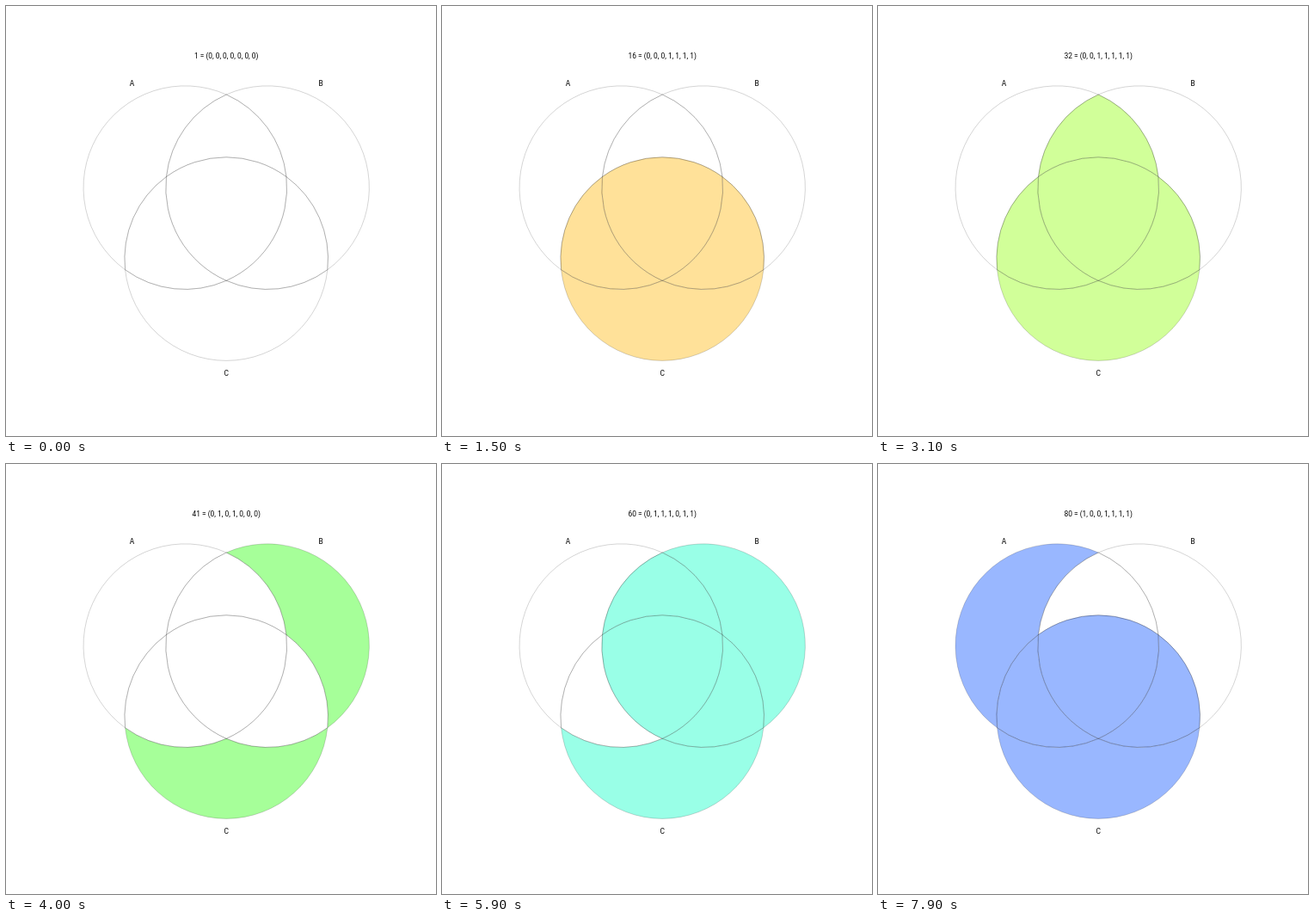
Animation of 500x500 px, one loop 8000 ms. Source, as an HTML page:

```html
<!DOCTYPE html>
<html lang="en">
<head>
<meta charset="utf-8">
<title>Venn diagram subsets</title>
<style>
  html, body { margin: 0; width: 100%; height: 100%; overflow: hidden; background: #fff; }
  svg { display: block; width: 100%; height: 100%; }
  text { font: 8.4px Roboto, sans-serif; text-anchor: middle; fill: #000; }
  #lines { fill: none; stroke: #000; stroke-opacity: .17; stroke-width: 1; stroke-linejoin: round; }
</style>
</head>
<body>
<svg viewBox="0 0 500 500">
  <g id="fills"></g>
  <g id="lines"></g>
  <text id="title" x="256.2" y="61"></text>
  <text x="146.5" y="93">A</text>
  <text x="366" y="93">B</text>
  <text x="256.2" y="430">C</text>
</svg>
<script>
const CX = 256.2, CY = 238.8, R = 118.3, SIDE = 95.75;
const STEP = 100, COUNT = 80;
const $ = id => document.getElementById(id);

// Distances from the centroid to the outer and inner crossings
const half = Math.sqrt(R * R - SIDE * SIDE / 4);
const inset = SIDE / (2 * Math.sqrt(3));
const OUTER = half + inset, INNER = half - inset;

function point(dist, deg) {
  const a = deg * Math.PI / 180;
  return `${(CX + dist * Math.cos(a)).toFixed(3)} ${(CY + dist * Math.sin(a)).toFixed(3)}`;
}

// Corners are [distance, angle, sweep of the arc that leaves the corner]
function outline(corners, turn) {
  const pts = corners.map(([d, a]) => point(d, a + turn));
  return `M${pts[0]}` + corners.map(([, , sweep], i) =>
    `A${R} ${R} 0 0 ${sweep} ${pts[(i + 1) % pts.length]}`).join('') + 'Z';
}

const single = [[OUTER, 150, 1], [OUTER, 270, 0], [INNER, 210, 0]];
const pair = [[OUTER, 270, 1], [INNER, 330, 0], [INNER, 210, 1]];
const core = [[INNER, 90, 1], [INNER, 210, 1], [INNER, 330, 1]];

// Order of the bits: A, B, AB, C, AC, BC, ABC
const regions = [
  [single, 0], [single, 120], [pair, 0], [single, -120],
  [pair, -120], [pair, 120], [core, 0]
];

function addPath(parent, d) {
  const path = document.createElementNS('http://www.w3.org/2000/svg', 'path');
  path.setAttribute('d', d);
  parent.appendChild(path);
  return path;
}

const fills = regions.map(([corners, turn]) => {
  const d = outline(corners, turn);
  addPath($('lines'), d);
  return addPath($('fills'), d);
});

let shown = -1;
function show(index) {
  if (index === shown) return;
  shown = index;
  const bits = [...index.toString(2).padStart(7, '0')];
  const color = `hsl(${index / 128 * 360}, 100%, 80%)`;
  fills.forEach((path, i) => path.setAttribute('fill', bits[i] === '1' ? color : 'none'));
  $('title').textContent = `${index + 1} = (${bits.join(', ')})`;
}

const start = performance.now();
function tick() {
  show(Math.floor((performance.now() - start) / STEP) % COUNT);
  requestAnimationFrame(tick);
}
tick();
</script>
</body>
</html>
```
